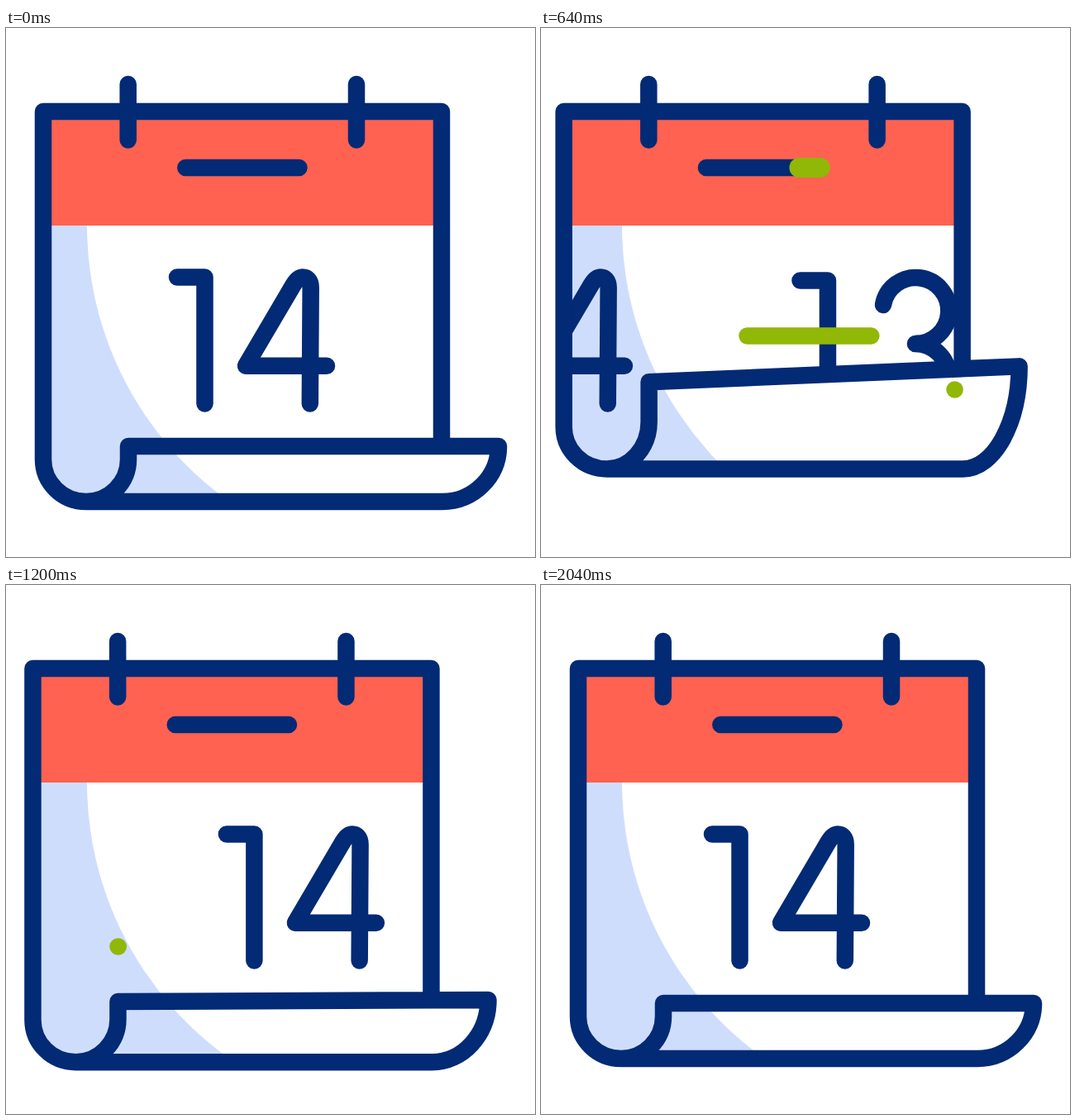
An HTML page for the animation above (2880 ms loop, 640 px wide and 640 px high).

```html
<!DOCTYPE html>
<html lang="en">
<head>
<meta charset="utf-8">
<title>Calendar</title>
<style>
  html, body { margin: 0; width: 100%; height: 100%; overflow: hidden; background: #fff; }
  svg { display: block; width: 100vw; height: 100vh; }
  .line { fill: none; stroke: #022a75; stroke-width: 20.5; stroke-linecap: round; stroke-linejoin: round; }
  .bar { stroke: #91b806; stroke-width: 20.5; stroke-linecap: round; }
  .shade { fill: #cfddfd; }
</style>
</head>
<body>
<svg viewBox="0 0 640 640">
  <defs>
    <clipPath id="bodyClip"><path id="bodyShape" class="slide"/></clipPath>
    <clipPath id="pageClip"><path id="pageShape" class="slide"/></clipPath>
    <clipPath id="dateClip"><rect class="slide" x="45" y="111" width="482" height="490"/></clipPath>
    <path id="shade" class="shade" d="M0 239H98A410 410 0 0 0 357 620H0Z"/>
    <g id="fourteen" class="line">
      <path d="M207 301.5H240.500V454.500"/>
      <path d="M367.800 454.500L368.700 314C368.700 305 364 301.500 359 301.500C354 301.500 351 305 347.500 311L290 408.700H388"/>
    </g>
    <g id="thirteen" class="line">
      <path d="M207 305.500H240.500V458.500"/>
      <path d="M307.500 335A40 40 0 1 1 346.500 382A40 40 0 1 1 306.500 420.500"/>
    </g>
  </defs>

  <g clip-path="url(#bodyClip)"><use href="#shade"/></g>
  <g clip-path="url(#dateClip)">
    <use class="date" href="#fourteen"/>
    <use class="date" href="#thirteen"/>
    <use class="date" href="#fourteen"/>
  </g>
  <path id="page" class="slide" fill="#fff"/>
  <g clip-path="url(#pageClip)"><use href="#shade"/></g>

  <g class="slide">
    <path fill="#ff6251" d="M45 101H527V239H45Z"/>
    <path id="outline" class="line"/>
    <path class="line" d="M147.700 68V135.500M424 68V135.500M217.300 169H354.500"/>
    <line class="bar" y1="169" y2="169" style="stroke-width:24"/>
    <line class="bar" y1="372.500" y2="372.500"/>
    <line class="bar" y1="437.600" y2="437.600"/>
  </g>
</svg>
<script>
  const LOOP = 2880, STEP = 40;
  const $ = id => document.getElementById(id);
  const all = cls => [...document.querySelectorAll(cls)];
  const sliding = all('.slide'), dates = all('.date'), bars = all('.bar');

  // [time, offset] pairs, eased between neighbours
  const swing = [[0, 0], [280, 32], [560, -26], [840, 17.5], [1120, -14], [1520, 0]];
  const flap = values => [0, 280, 700, 1080, 1500, 2040].map((t, i) => [t, values[i]]);
  const foldLeft = flap([0, 28, -84, 9.8, -50, 0]);
  const foldRight = flap([0, 29, -104, 9, -57, 0]);
  const bottomEdge = flap([0, 27, -43.5, 10.5, -21.4, 0]);

  const dateStart = [0, 393.5, 1108];
  const streaks = [
    { from: 355, to: 217, head: 520, tail: 680 },
    { from: 557.5, to: 142, head: 360, tail: 468 },
    { from: 518, to: 148, head: 636, tail: 768 }
  ];
  const STREAK_TIME = 440;

  const clamp = x => Math.min(1, Math.max(0, x));
  const smooth = x => x * x * (3 - 2 * x);
  const progress = (t, start, length) => clamp((t - start) / length);

  function track(keys, t) {
    const i = keys.findIndex(k => k[0] > t);
    if (i < 0) return keys[keys.length - 1][1];
    const [t0, a] = keys[i - 1], [t1, b] = keys[i];
    return a + (b - a) * smooth((t - t0) / (t1 - t0));
  }

  // Same as cubic-bezier(.53, 0, .47, 1)
  function bezier(x) {
    let lo = 0, hi = 1;
    for (let i = 0; i < 24; i++) {
      const s = (lo + hi) / 2, r = 1 - s;
      const at = 3 * r * r * s * 0.53 + 3 * r * s * s * 0.47 + s * s * s;
      if (at < x) lo = s; else hi = s;
    }
    return smooth(lo);
  }

  function drawPage(t) {
    const left = 506 + track(foldLeft, t);
    const right = 506 + track(foldRight, t);
    const base = 573 + track(bottomEdge, t);
    const curlTop = base - 51 - 0.15 * (base - left - 67);
    const curl = `C125 ${base} 148 ${base - (base - curlTop) * 0.45} 148 ${curlTop}V${left}`;
    const side = `C596 ${right + 0.55 * (base - right)} 565.500 ${base} 528 ${base}`;
    const spine = `V${base - 51}A52 51 0 0 0 97 ${base}`;
    const sheet = `M97 ${base}${curl}L596 ${right}${side}Z`;
    $('page').setAttribute('d', sheet);
    $('pageShape').setAttribute('d', sheet);
    $('bodyShape').setAttribute('d', `M596 ${right}H527V101H45${spine}H528C565.500 ${base} 596 ${right + 0.55 * (base - right)} 596 ${right}Z`);
    $('outline').setAttribute('d', `M527 ${right}V101H45${spine}${curl}L596 ${right}${side}H97`);
  }

  function drawBar(bar, s, t) {
    const head = progress(t, s.head, STREAK_TIME), tail = progress(t, s.tail, STREAK_TIME);
    const place = p => s.from + (s.to - s.from) * smooth(p);
    bar.setAttribute('x1', place(head));
    bar.setAttribute('x2', place(tail));
    bar.style.display = head > 0 && tail < 1 ? '' : 'none';
  }

  function draw(t) {
    const dx = track(swing, t);
    sliding.forEach(el => el.setAttribute('transform', `translate(${dx} 0)`));
    const travel = 1108 * bezier(progress(t, 150, 1300));
    dates.forEach((el, i) => el.setAttribute('transform', `translate(${dateStart[i] - travel} 0)`));
    drawPage(t);
    bars.forEach((bar, i) => drawBar(bar, streaks[i], t));
  }

  const begin = performance.now();
  function tick() {
    const t = (performance.now() - begin) % LOOP;
    draw(Math.floor(t / STEP) * STEP);
    requestAnimationFrame(tick);
  }
  tick();
</script>
</body>
</html>
```
